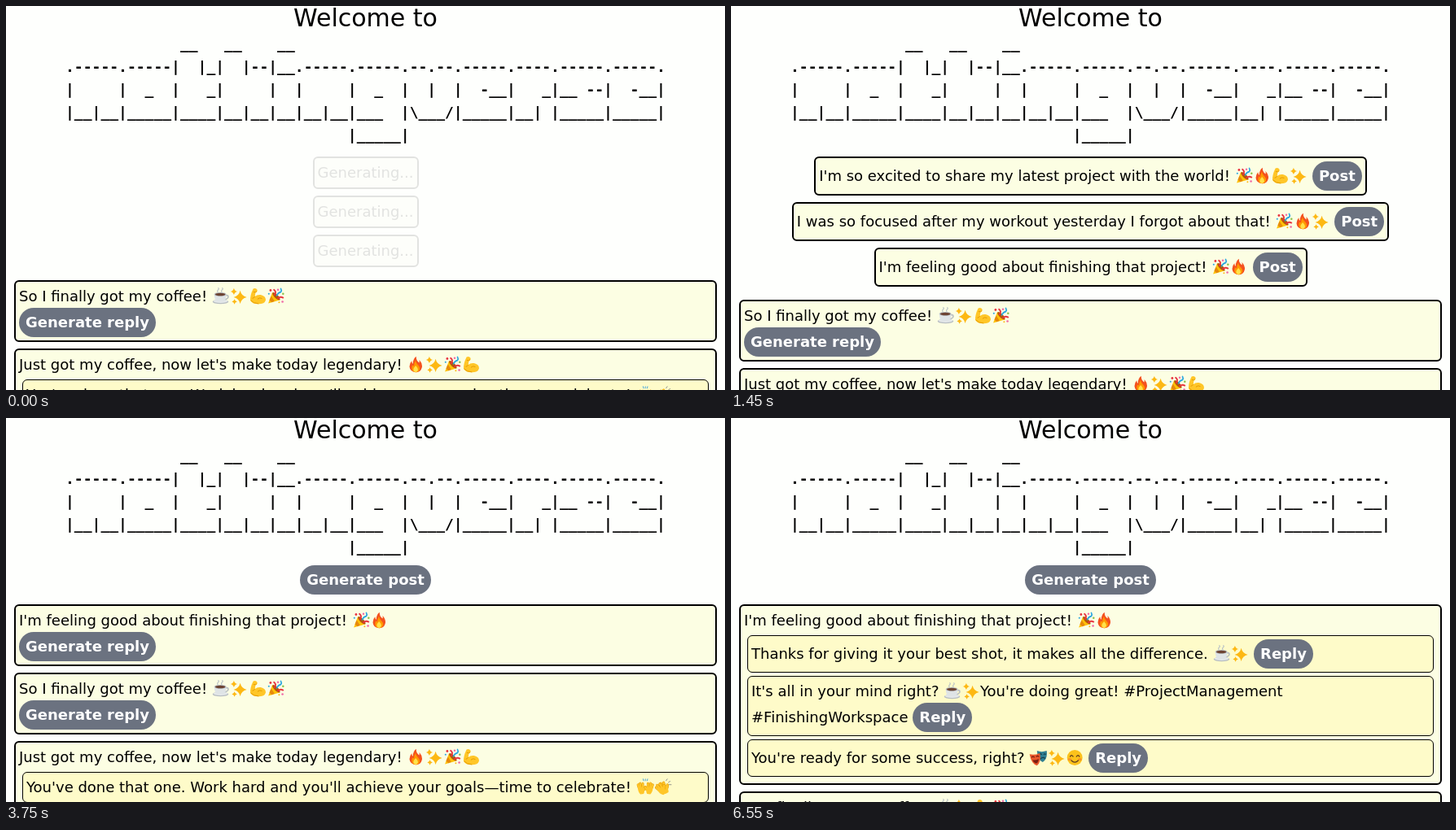
An HTML page for the animation above (8000 ms loop, 883 by 472 pixels).

```html
<!DOCTYPE html>
<html lang="en">
<head>
<meta charset="utf-8">
<title>Welcome</title>
<style>
  html, body { margin: 0; width: 100%; height: 100%; overflow: hidden; background: #fefffd; }
  #stage {
    position: relative; width: 883px; height: 472px; overflow: hidden;
    font: 18px/28px "DejaVu Sans", sans-serif; color: #000;
  }
  #page { position: absolute; top: -3px; left: 0; width: 883px; }
  h1 { margin: 0; font-size: 30px; line-height: 36px; font-weight: 400; text-align: center; }
  pre {
    width: max-content; margin: 0 auto;
    font: bold 18px/28px "DejaVu Sans Mono", monospace;
  }
  #panel { display: grid; justify-items: center; gap: 8px; padding: 8px 0 12px; }
  #panel.choices { padding: 12px 0 16px; }
  .post, .option {
    box-sizing: border-box; padding: 4px; border: 2px solid #000;
    border-radius: 6px; background: #fcfee3;
  }
  .post { margin: 0 10px 8px; }
  .post.last { height: 320px; }
  .reply {
    margin: 4px; padding: 4px; border: 1px solid #000;
    border-radius: 6px; background: #fefbc9;
  }
  .button {
    display: inline-block; padding: 4px 8px; border-radius: 18px;
    background: #6b7280; color: #fff; font-weight: bold;
  }
  svg { width: 22.4px; height: 21px; vertical-align: -4px; }
</style>
</head>
<body>
<div id="stage">
  <div id="page">
    <h1>Welcome to</h1>
    <pre id="banner"></pre>
    <div id="panel"></div>
    <div id="feed"></div>
  </div>
</div>
<script>
const LOOP = 8000;
const SHOW_OPTIONS = 150, POST = 2750, INSERT = 3750, REPLY = 5950, SHOW_REPLIES = 6100;

const $ = id => document.getElementById(id);
const clamp = x => Math.max(0, Math.min(1, x));
const easeOut = p => Math.sin(clamp(p) * Math.PI / 2);

$('banner').textContent = [
  '             __   __    __',
  '.-----.-----|  |_|  |--|__.-----.-----.--.--.-----.----.-----.-----.',
  '|     |  _  |   _|     |  |     |  _  |  |  |  -__|   _|__ --|  -__|',
  '|__|__|_____|____|__|__|__|__|__|___  |\\___/|_____|__| |_____|_____|',
  '                                |_____|'
].join('\n');

// Emoji drawings, all in a 32 x 30 box
const path = (fill, d) => `<path fill="${fill}" d="${d}"/>`;
const line = (color, width, d) =>
  `<path fill="none" stroke="${color}" stroke-width="${width}" stroke-linecap="round" d="${d}"/>`;
const dot = (fill, x, y, r, ry = r) => `<ellipse fill="${fill}" cx="${x}" cy="${y}" rx="${r}" ry="${ry}"/>`;
const star = (x, y, r) => {
  const k = r * 0.18;
  return path('#fdb813', `M${x} ${y - r}Q${x + k} ${y - k} ${x + r} ${y}Q${x + k} ${y + k} ${x} ${y + r}` +
    `Q${x - k} ${y + k} ${x - r} ${y}Q${x - k} ${y - k} ${x} ${y - r}Z`);
};
const hand = transform => `<g transform="${transform}">` +
  line('#e59a00', 4.6, 'M-4 -3L-5 -9M-1 -4L-1 -11M3 -4L4 -10M5 1L8 -3') +
  line('#ffc628', 3.4, 'M-4 -3L-5 -9M-1 -4L-1 -11M3 -4L4 -10M5 1L8 -3') +
  path('#ffc628', 'M-6 -4L5 -4Q7 3 3 9L-3 9Q-7 4 -6 -4Z') + '</g>';

const emoji = {
  '🎉': path('#ffc107', 'M3 28L10 9Q20 13 23 22Z') +
    path('#e6890c', 'M5 22L8 15L14 24L9 26Z') +
    `<ellipse fill="#b3560b" cx="17" cy="15.5" rx="9" ry="3.2" transform="rotate(45 17 15.5)"/>` +
    line('#e8343f', 2.6, 'M14 13Q18 8 13 4M20 19Q24 15 29 18') +
    line('#2aa7e0', 2.4, 'M18 14Q20 9 25 8Q27 5 25 2') +
    dot('#e8343f', 7, 5, 2) + dot('#f06ba8', 20, 4, 1.7) + dot('#8bc34a', 29, 11, 1.8) +
    dot('#2aa7e0', 4, 11, 1.5) + dot('#f06ba8', 28, 25, 1.9) + dot('#fdb813', 22, 26, 1.4),
  '🔥': path('#f4511e', 'M17 1Q16 7 22 12Q23 10 22 7Q28 13 27 20Q25 29 16 29Q6 28 5 19Q5 13 9 9Q9 13 11 14Q11 5 17 1Z') +
    path('#ff9800', 'M16 8Q16 13 21 17Q24 20 23 24Q21 29 16 29Q9 28 9 21Q9 18 11 16Q12 18 13 18Q13 12 16 8Z') +
    path('#ffe24a', 'M16 17Q20 21 20 25Q19 28 16 28.5Q12 28 12 24Q12 21 16 17Z'),
  '💪': path('#ffc628', 'M8 2Q13 0 15 4Q16 8 12 9L11 16Q15 12 21 13Q30 15 30 22Q28 29 17 29Q6 29 3 23Q2 14 8 2Z') +
    line('#e59a00', 1.4, 'M9 8Q12 10 14 7M11 16Q9 19 7 19M16 20Q19 17 23 19M4 23Q8 28 17 28.5'),
  '✨': star(18, 17, 11.5) + star(7, 7, 6) + star(8, 25, 4.6),
  '☕': dot('#b8bec2', 15, 25, 14, 4) + dot('#e4e8ea', 15, 24, 12.5, 3) +
    line('#b8bec2', 2.4, 'M24 14Q30 13 28 18Q26 21 22 21') +
    path('#dfe4e6', 'M4 12H25Q25 23 19 25H10Q4 23 4 12Z') +
    dot('#b8bec2', 14.5, 12, 10.5, 3.6) + dot('#6d4433', 14.5, 12.3, 8.8, 2.5) +
    line('#b9c2c6', 1.6, 'M11 9Q8 6 11 4Q13 2 11 1M18 9Q15 6 18 4Q20 2 18 1'),
  '🙌': hand('translate(9 19) rotate(-8) scale(.95)') + hand('translate(23 19) rotate(8) scale(-.95 .95)') +
    line('#4fa9dc', 1.5, 'M13 4L12 1M16 4V1M19 4L20 1'),
  '👏': hand('translate(18 18) rotate(-30)') + hand('translate(13 20) rotate(-38)') +
    line('#8d8d8d', 1.3, 'M21 4L23 1M25 7L28 5M26 11H30'),
  '🎭': path('#2f7f92', 'M14 3Q22 6 31 3Q33 17 24 23Q15 20 14 3Z') +
    line('#123f4c', 1.7, 'M18 9Q20 7 22 9M26 9Q28 8 29 9M20 17Q24 13 28 16') +
    path('#e9572b', 'M1 9Q10 11 19 7Q22 22 14 29Q4 26 1 9Z') +
    line('#7b1d10', 1.8, 'M5 14Q7 12 9 14M13 13Q15 11 17 13') + path('#7b1d10', 'M6 19Q12 20 17 17Q16 25 12 25Q8 24 6 19Z'),
  '😊': dot('#fcc21b', 16, 15, 13.5) + dot('#f79329', 7, 18, 3.4, 2.2) + dot('#f79329', 25, 18, 3.4, 2.2) +
    line('#5d3b1d', 1.8, 'M8 13Q10 9 13 13M19 13Q22 9 24 13M10 20Q16 26 22 20')
};
const anyEmoji = new RegExp(Object.keys(emoji).join('|'), 'gu');
const rich = text => text.replace(anyEmoji, e => `<svg viewBox="0 0 32 30">${emoji[e]}</svg>`);

const button = (label, cls = '') => `<span class="button ${cls}">${label}</span>`;
const option = html => `<div class="option fade">${html}</div>`;
const reply = (html, cls = '') => `<div class="reply ${cls}">${html}</div>`;
const post = (text, html, cls = '') => `<div class="post ${cls}"><div>${rich(text)}</div>${html}</div>`;

const waiting = Array(3).fill('Generating...');
const project = "I'm feeling good about finishing that project! 🎉🔥";
const drafts = [
  "I'm so excited to share my latest project with the world! 🎉🔥💪✨",
  'I was so focused after my workout yesterday I forgot about that! 🎉🔥✨',
  project
].map((text, i) => rich(text) + ' ' + button('Post', i === 2 ? 'hot' : ''));
const answers = [
  'Thanks for giving it your best shot, it makes all the difference. ☕✨',
  "It's all in your mind right? ☕✨You're doing great! #ProjectManagement #FinishingWorkspace",
  "You're ready for some success, right? 🎭✨😊"
].map(text => rich(text) + ' ' + button('Reply'));

const older = post('So I finally got my coffee! ☕✨💪🎉', button('Generate reply')) +
  post("Just got my coffee, now let's make today legendary! 🔥✨🎉💪",
    reply(rich("You've done that one. Work hard and you'll achieve your goals—time to celebrate! 🙌👏")), 'last');

const replies = list => post(project, list.map(html => reply(html, 'fade')).join(''));
const choices = list => list.map(option).join('');
const generate = button('Generate post');

// Each scene: end time, panel, feed above the older posts
const scenes = [
  [SHOW_OPTIONS, choices(waiting), ''],
  [POST, choices(drafts), ''],
  [INSERT, generate, ''],
  [REPLY, generate, post(project, button('Generate reply', 'hot'))],
  [SHOW_REPLIES, generate, replies(waiting)],
  [LOOP, generate, replies(answers)]
];

let shown = -1;
function render(t) {
  const n = scenes.findIndex(scene => t < scene[0]);
  if (n !== shown) {
    shown = n;
    $('panel').className = n < 2 ? 'choices' : '';
    $('panel').innerHTML = scenes[n][1];
    $('feed').innerHTML = scenes[n][2] + older;
  }
  const opacity = t < POST ? easeOut((t + 100) / 1500) : easeOut((t - REPLY + 50) / 600);
  document.querySelectorAll('.fade').forEach(el => el.style.opacity = opacity);

  const hover = clamp((t - (t < POST ? 2200 : 5250)) / 100);
  const mix = (a, b) => Math.round(a + (b - a) * hover);
  const hot = document.querySelector('.hot');
  if (hot) hot.style.background = `rgb(${mix(107, 55)},${mix(114, 65)},${mix(128, 81)})`;
}

const start = performance.now();
function tick() {
  render((performance.now() - start) % LOOP);
  requestAnimationFrame(tick);
}
render(0);
requestAnimationFrame(tick);
</script>
</body>
</html>
```
